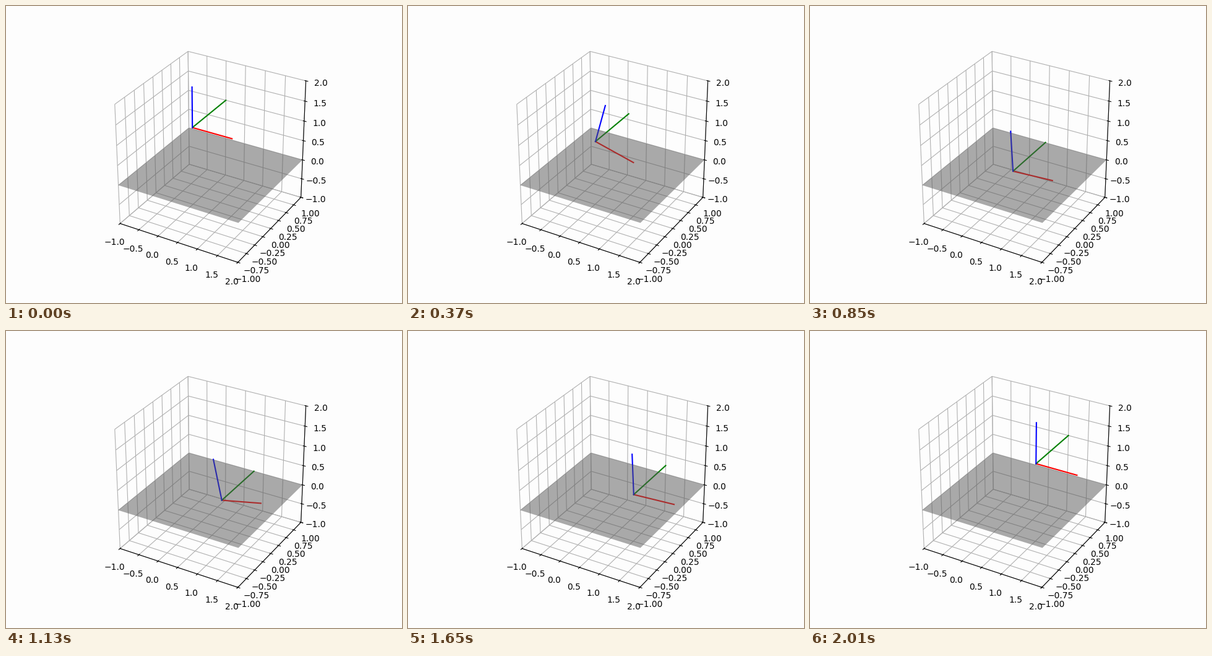
A matplotlib script that plays this animation: 640x480 px, repeating every 2.05 s.

```python
import numpy as np
import matplotlib.pyplot as plt
from matplotlib.animation import FuncAnimation

LOOP, TICK = 2050, 10          # ms
START, STEP = 90, 40           # the pose advances every STEP ms after START


def min_jerk(t, start, length):
    s = np.clip((t - start) / length, 0, 1)
    return s ** 3 * (10 - 15 * s + 6 * s * s)


def height(t):
    """Drop onto the plane, slide along it, lift off again."""
    drop = (1 - min(t / 21.6, 1) ** 1.85) ** 3.2
    return drop + min_jerk(t, 34.3, 13.8)


def pitch(t):
    """Tip forward, swing back while sliding, level out."""
    return np.radians(17.5 * min_jerk(t, 0, 7)
                      - 32.5 * min_jerk(t, -.8, 34.3)
                      + 15 * min_jerk(t, 24, 22))


def pose(t):
    """Origin and rotation matrix at step t."""
    c, s = np.cos(pitch(t)), np.sin(pitch(t))
    origin = np.array([min_jerk(t, 1.4, 38.4), 0, height(t)])
    return origin, np.array([[c, 0, s], [0, 1, 0], [-s, 0, c]])


fig = plt.figure(figsize=(6.4, 4.8), dpi=100, facecolor="#fdfdfd")
ax = fig.add_subplot(projection="3d", facecolor="none")
ax.set_box_aspect((1, 1, 1))
ax.set(xlim=(-1, 2), ylim=(-1, 1), zlim=(-1, 2))
for axis in (ax.xaxis, ax.yaxis, ax.zaxis):
    axis.set_pane_color((1, 1, 1, 0))

px, py = np.meshgrid([-1, 2], [-1, 1])
ax.plot_surface(px, py, np.zeros_like(px), color="0.34", alpha=.5, shade=False)
arms = [ax.plot([], [], [], color=c)[0] for c in ("red", "green", "blue")]


def update(n):
    origin, rot = pose(max(0, (n * TICK - START) // STEP))
    for arm, direction in zip(arms, rot.T):
        arm.set_data_3d(*np.transpose([origin, origin + direction]))
    return arms


anim = FuncAnimation(fig, update, frames=LOOP // TICK, interval=TICK,
                     init_func=lambda: update(0), repeat=True, repeat_delay=0)
plt.show()
```
